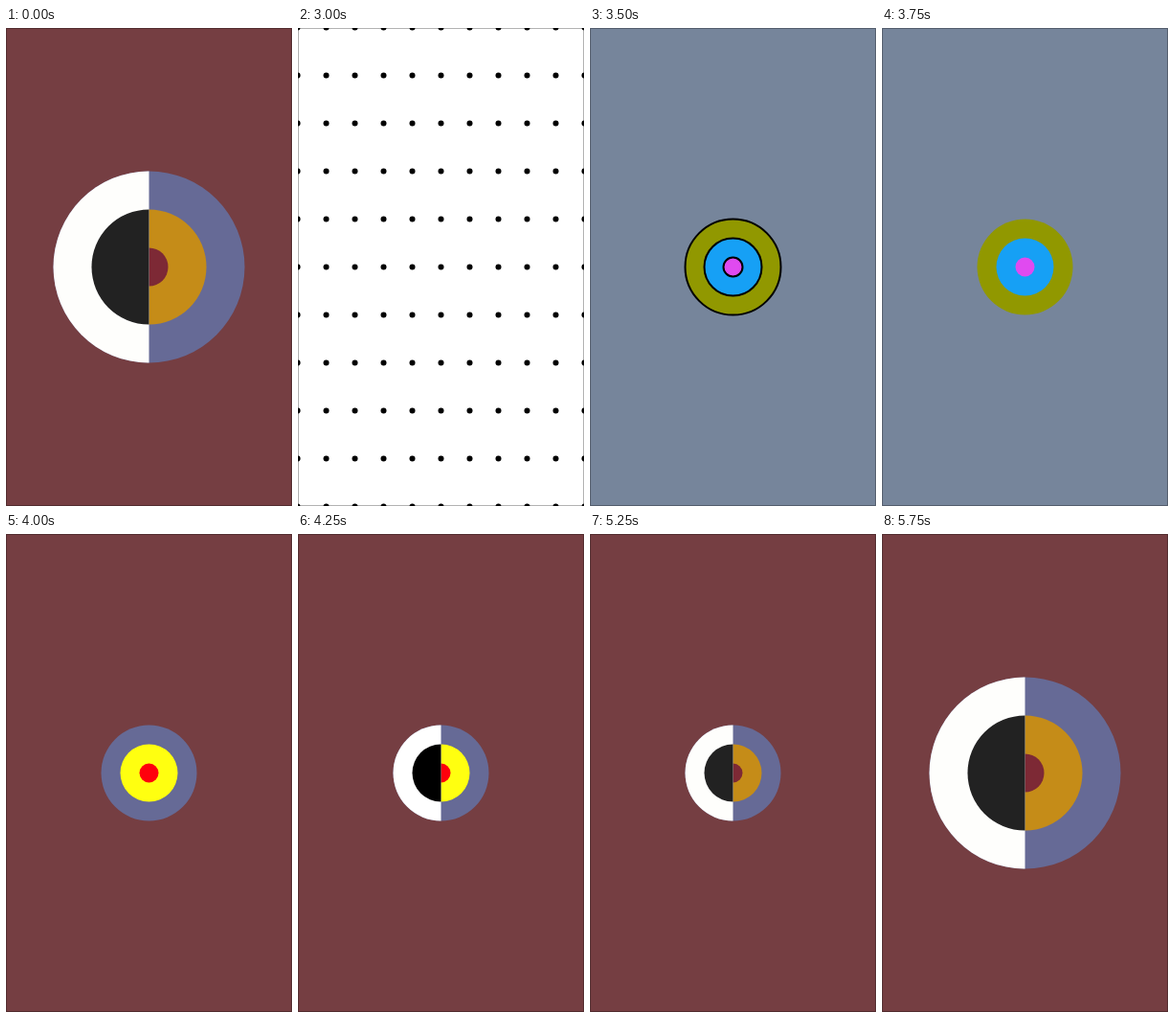
Animation of 299 by 499 pixels, one loop 6000 ms. Source, as an HTML page with a canvas:

```html
<!DOCTYPE html>
<html>
<head>
<meta charset="utf-8">
<title>Concentric circles</title>
<style>
html, body { margin: 0; width: 100%; height: 100%; overflow: hidden; }
canvas { display: block; }
</style>
</head>
<body>
<canvas id="stage" width="299" height="499"></canvas>
<script>
const ctx = document.getElementById('stage').getContext('2d');
const W = 299, H = 499, CX = W / 2, CY = H / 2, TAU = Math.PI * 2;
const HOLD = 3000, STEP = 250, LOOP = 6000;

const SLATE = '#76859b', MAROON = '#753e42', BLUE = '#666a96';
const ACID = ['#919800', '#16a0f5', '#e04af0'];
const COOL = [BLUE, '#ffff10', '#ff000c'];
const MUTED = [BLUE, '#c58c18', '#7d2935'];
const MONO = ['#fff', '#000', COOL[2]];
const SOFT = ['#fefefc', '#222', COOL[2]];
const SOFT_MUTED = ['#fefefc', '#222', MUTED[2]];

function ground(color) {
  ctx.fillStyle = color;
  ctx.fillRect(0, 0, W, H);
}

// Three discs with radii in the ratio 5 : 3 : 1, or only their left halves
function discs(unit, colors, { half = false, outline = false } = {}) {
  colors.forEach((color, i) => {
    ctx.beginPath();
    ctx.arc(CX, CY, unit * (5 - 2 * i), half ? TAU / 4 : 0, half ? TAU * 3 / 4 : TAU);
    ctx.fillStyle = color;
    ctx.fill();
    if (outline) {
      ctx.strokeStyle = '#000';
      ctx.lineWidth = 2;
      ctx.stroke();
    }
  });
}

function target(bg, unit, colors, options) {
  ground(bg);
  discs(unit, colors, options);
}

// The centre shows on the right side only
function split(unit, left, right) {
  target(MAROON, unit, right);
  discs(unit, left.slice(0, 2), { half: true });
}

function dots() {
  ground('#fff');
  ctx.fillStyle = '#000';
  for (let x = -0.5; x <= W + 1; x += 30) {
    for (let y = -0.5; y <= H + 1; y += 50) {
      ctx.beginPath();
      ctx.arc(x, y, 3, 0, TAU);
      ctx.fill();
    }
  }
}

const large = () => split(20, SOFT_MUTED, MUTED);
const small = () => split(10, SOFT_MUTED, MUTED);

const scenes = [
  dots,
  () => target(SLATE, 1, ACID, { outline: true }),
  () => target(SLATE, 10, ACID, { outline: true }),
  () => target(SLATE, 10, ACID),
  () => target(MAROON, 10, COOL),
  () => split(10, MONO, COOL),
  () => split(10, COOL, MONO),
  () => split(10, MUTED, SOFT),
  () => split(10, MUTED, SOFT_MUTED),
  small,
  small,
  large
];

function frame() {
  const t = performance.now() % LOOP;
  const scene = t < HOLD ? large : scenes[Math.floor((t - HOLD) / STEP)];
  scene();
  ctx.strokeStyle = 'rgba(0, 0, 0, 0.3)';
  ctx.lineWidth = 1;
  ctx.strokeRect(0.5, 0.5, W - 1, H - 1);
  requestAnimationFrame(frame);
}
frame();
</script>
</body>
</html>
```
